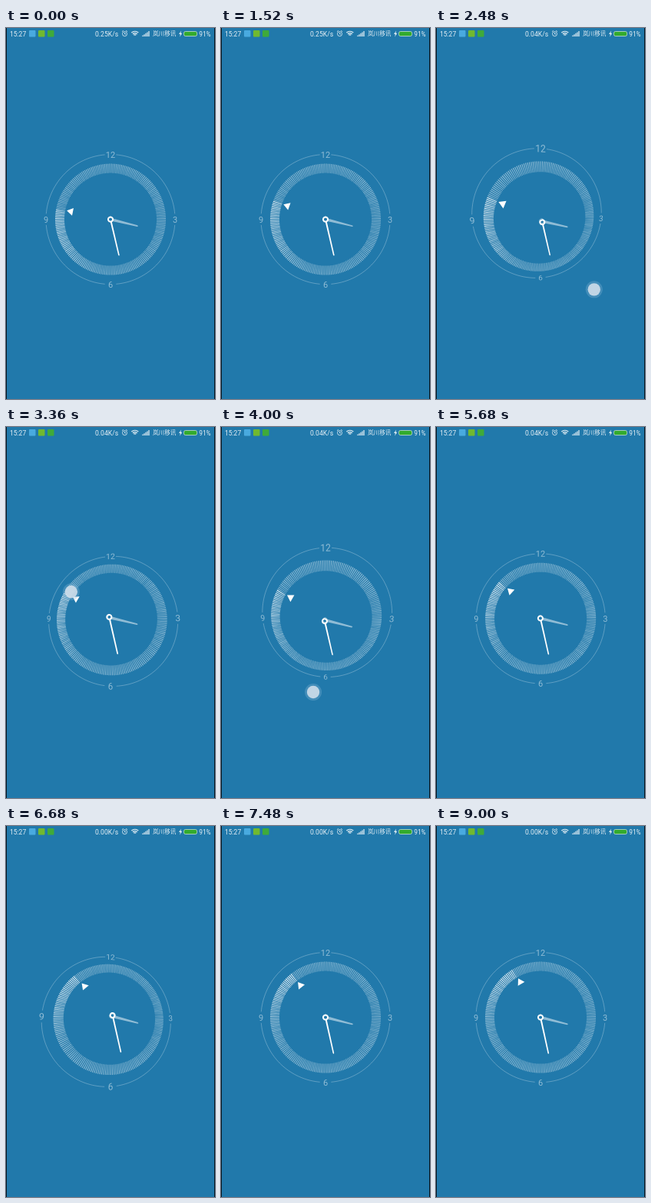
An HTML page that plays this animation: 272 px wide and 480 px high, repeating every 9040 ms.

```html
<!DOCTYPE html>
<html lang="zh">
<head>
<meta charset="utf-8">
<title>Tilting clock</title>
<style>
  html, body { margin: 0; width: 100%; height: 100%; overflow: hidden; background: #2179ab; }
  svg { display: block; width: 100vw; height: 100vh; }
  text { font-family: Roboto, "Noto Sans CJK SC", "Noto Sans CJK", sans-serif; fill: #fff; }
  .bar { fill-opacity: .88; }
</style>
</head>
<body>
<svg viewBox="0 0 272 480">
  <rect width="272" height="480" fill="#2179ab"/>
  <g class="bar">
    <text x="5" y="10.8" font-size="8.5">15:27</text>
    <rect x="30" y="3" width="8.5" height="8.5" rx="1" fill="#4fb0e6"/>
    <rect x="42" y="3" width="8.5" height="8.5" rx="1" fill="#7cc21e"/>
    <rect x="54" y="3" width="8.5" height="8.5" rx="1" fill="#43b02a"/>
    <text id="speed" x="116" y="10.8" font-size="8.6"></text>
    <g fill="none" stroke="#fff" stroke-width=".8" stroke-opacity=".9">
      <circle cx="154.5" cy="7.6" r="3"/>
      <path d="M154.5 5.8v2h1.5M151 4.8l1.8-1.6M158 4.8l-1.8-1.6"/>
      <path d="M163.3 6q4.500-3.600 9 0M164.900 7.700q2.900-2.200 5.800 0M166.300 9.200q1.500-1.200 3 0" stroke-width="1.1"/>
      <path d="M178 11v-1.500M180 11v-2.800M182 11v-4.200M184 11v-5.600M186 11v-7" stroke-width="1.2"/>
    </g>
    <text x="191" y="10.400" font-size="7.6">岚川移讯</text>
    <path d="M228 3.500l-3 4.500h2l-1 3.500l3.300-4.800h-2z" fill="#fff"/>
    <rect x="231.500" y="4.500" width="17" height="6" rx="2" fill="#36b21c" stroke="#d5e8dc" stroke-width=".7"/>
    <text x="251.300" y="10.600" font-size="8.200">91%</text>
  </g>
  <g id="clock"></g>
  <g id="touch">
    <circle r="11" fill="#8fbddb" fill-opacity=".3"/>
    <circle r="8.200" fill="#d6e2ec" fill-opacity=".85"/>
  </g>
  <path d="M.5 0v480M271.500 0v480" stroke="#05131c"/>
</svg>
<script>
const LOOP = 9040, CX = 136, CY = 247.6, R = 100, RIM = 84;
const DEPTH = 144, MAX_TILT = Math.PI / 18, MAX_SHIFT = 2;
const SHAKE_MS = 1100, SHAKE_PERIOD = 0.571429, FADE_MS = 190, LAG = 40;
const RAD = Math.PI / 180, TICKS = 200;

// Each drag is a list of [time, x, y].
const drags = [
  [[2040, 105, 322], [2260, 152, 347], [2480, 205.5, 338.5], [2640, 252, 296],
   [2780, 243, 245], [2960, 212, 192], [3160, 140, 172], [3360, 85, 213],
   [3600, 62, 272], [3860, 88, 328], [4140, 158, 351], [4400, 234, 355], [4595, 264, 355]],
  [[5800, 190, 215], [5960, 132, 175], [6100, 82, 222], [6240, 52, 300], [6375, 35, 354]]
];

const el = id => document.getElementById(id);
const clock = el('clock'), touch = el('touch'), speed = el('speed');
function add(tag, attrs) {
  const node = document.createElementNS('http://www.w3.org/2000/svg', tag);
  for (const k in attrs) node.setAttribute(k, attrs[k]);
  return clock.appendChild(node);
}

const dim = { fill: '#fff', 'fill-opacity': .5 };
const outline = (width, opacity) =>
  ({ fill: 'none', stroke: '#fff', 'stroke-width': width, 'stroke-opacity': opacity });
const rim = add('path', outline(.55, .5));
const numerals = [['12', 0, -RIM], ['3', RIM, 0], ['6', 0, RIM], ['9', -RIM, 0]].map(([label, x, y]) => {
  const node = add('text', { ...dim, 'font-size': 11, 'text-anchor': 'middle', y: 3.9,
    style: 'fill-opacity:.5' });
  node.textContent = label;
  return { node, x, y };
});
const ticks = Array.from({ length: TICKS }, () => add('path', { fill: '#fff' }));
const pointer = add('path', { fill: '#fff' });
const hourHand = add('path', dim), hourHub = add('path', outline(1, .5));
const minuteHand = add('path', { fill: '#fff' }), minuteHub = add('path', outline(2, 1));

const clamp = (v, lo, hi) => Math.max(lo, Math.min(hi, v));

function dragAt(points, t) {
  const n = points.length - 1;
  t = clamp(t, points[0][0], points[n][0]);
  let i = 0;
  while (i < n - 1 && t > points[i + 1][0]) i++;
  const a = points[Math.max(0, i - 1)], b = points[i], c = points[i + 1], d = points[Math.min(n, i + 2)];
  const h = c[0] - b[0], u = (t - b[0]) / h;
  return [1, 2].map(k => {
    const m0 = (c[k] - a[k]) / (c[0] - a[0]) * h, m1 = (d[k] - b[k]) / (d[0] - b[0]) * h;
    return b[k] + u * (m0 + u * (3 * (c[k] - b[k]) - 2 * m0 - m1 + u * (2 * (b[k] - c[k]) + m0 + m1)));
  });
}

function stateAt(t) {
  for (const points of drags) {
    const start = points[0][0], end = points[points.length - 1][0];
    if (t < start || t > end + SHAKE_MS) continue;
    const [x, y] = dragAt(points, t);
    const [lx, ly] = dragAt(points, t > end ? end : t - LAG);
    const s = Math.max(0, (t - end) / SHAKE_MS);
    const swing = Math.pow(2, -2 * s) * Math.cos(2 * Math.PI * s / SHAKE_PERIOD);
    return {
      x, y, alpha: clamp(1 - (t - end) / FADE_MS, 0, 1),
      px: clamp((lx - CX) / R, -1, 1) * swing,
      py: clamp((ly - CY) / R, -1, 1) * swing
    };
  }
  return { x: 0, y: 0, alpha: 0, px: 0, py: 0 };
}

function camera(px, py) {
  const ax = py * MAX_TILT, ay = px * MAX_TILT;
  const sx = Math.sin(ax), cx = Math.cos(ax), sy = Math.sin(ay), cy = Math.cos(ay);
  return (x, y) => {
    const z = x * sy, k = DEPTH / (DEPTH + y * sx + z * cx);
    return [CX + x * cy * k, CY + (y * cx - z * sx) * k];
  };
}

function render(t) {
  const { x, y, alpha, px, py } = stateAt(t);
  const project = camera(px, py);
  const second = 281.3 + 5.41 * t / 1000;
  const minute = 162 + second / 60, hour = 90 + minute / 12;

  // Points are (side, height) on a spoke; layer scales the parallax shift.
  const spoke = (deg, layer) => {
    const s = Math.sin(deg * RAD), c = Math.cos(deg * RAD), shift = MAX_SHIFT * layer;
    return (u, r) => project(u * c + r * s + px * shift, u * s - r * c + py * shift)
      .map(v => v.toFixed(2)).join(' ');
  };
  const polygon = (node, deg, layer, pts) => {
    const at = spoke(deg, layer);
    node.setAttribute('d', 'M' + pts.map(p => at(...p)).join('L') + 'Z');
  };
  const arc = (r, from, to, step, layer) => {
    let d = '';
    for (let a = from; a <= to; a += step) d += (d ? 'L' : 'M') + spoke(a, layer)(0, r);
    return d;
  };

  rim.setAttribute('d', [0, 90, 180, 270].map(a => arc(RIM, a + 5, a + 85, 2, 0)).join(''));
  for (const n of numerals) {
    const o = project(n.x, n.y), a = project(n.x + 1, n.y), b = project(n.x, n.y + 1);
    n.node.setAttribute('transform',
      `matrix(${[a[0] - o[0], a[1] - o[1], b[0] - o[0], b[1] - o[1], ...o].map(v => v.toFixed(4))})`);
  }

  const half = r => r * Math.PI / TICKS - .6;
  ticks.forEach((node, i) => {
    const deg = (i + .5) * 360 / TICKS, behind = ((second - deg) % 360 + 360) % 360;
    polygon(node, deg, 1, [[-half(72), 72], [half(72), 72], [half(60), 60], [-half(60), 60]]);
    node.setAttribute('fill-opacity', (.5 + .5 * Math.max(0, 1 - behind / 90)).toFixed(3));
  });

  polygon(pointer, second, 1, [[0, 58], [-5, 50], [5, 50]]);
  polygon(hourHand, hour, 1.2, [[-1.8, 3], [-.9, 36], [0, 37], [.9, 36], [1.8, 3]]);
  polygon(minuteHand, minute, 2, [[-1, 3], [-.8, 47.5], [0, 48.5], [.8, 47.5], [1, 3]]);
  hourHub.setAttribute('d', arc(3, 0, 345, 15, 1.2) + 'Z');
  minuteHub.setAttribute('d', arc(3, 0, 345, 15, 2) + 'Z');

  touch.setAttribute('transform', `translate(${x.toFixed(2)} ${y.toFixed(2)})`);
  touch.setAttribute('opacity', alpha);
  speed.textContent = (t < 1640 ? '0.25' : t < 6060 ? '0.04' : '0.00') + 'K/s';
}

const began = performance.now();
function frame() {
  render((performance.now() - began) % LOOP);
  requestAnimationFrame(frame);
}
frame();
</script>
</body>
</html>
```
